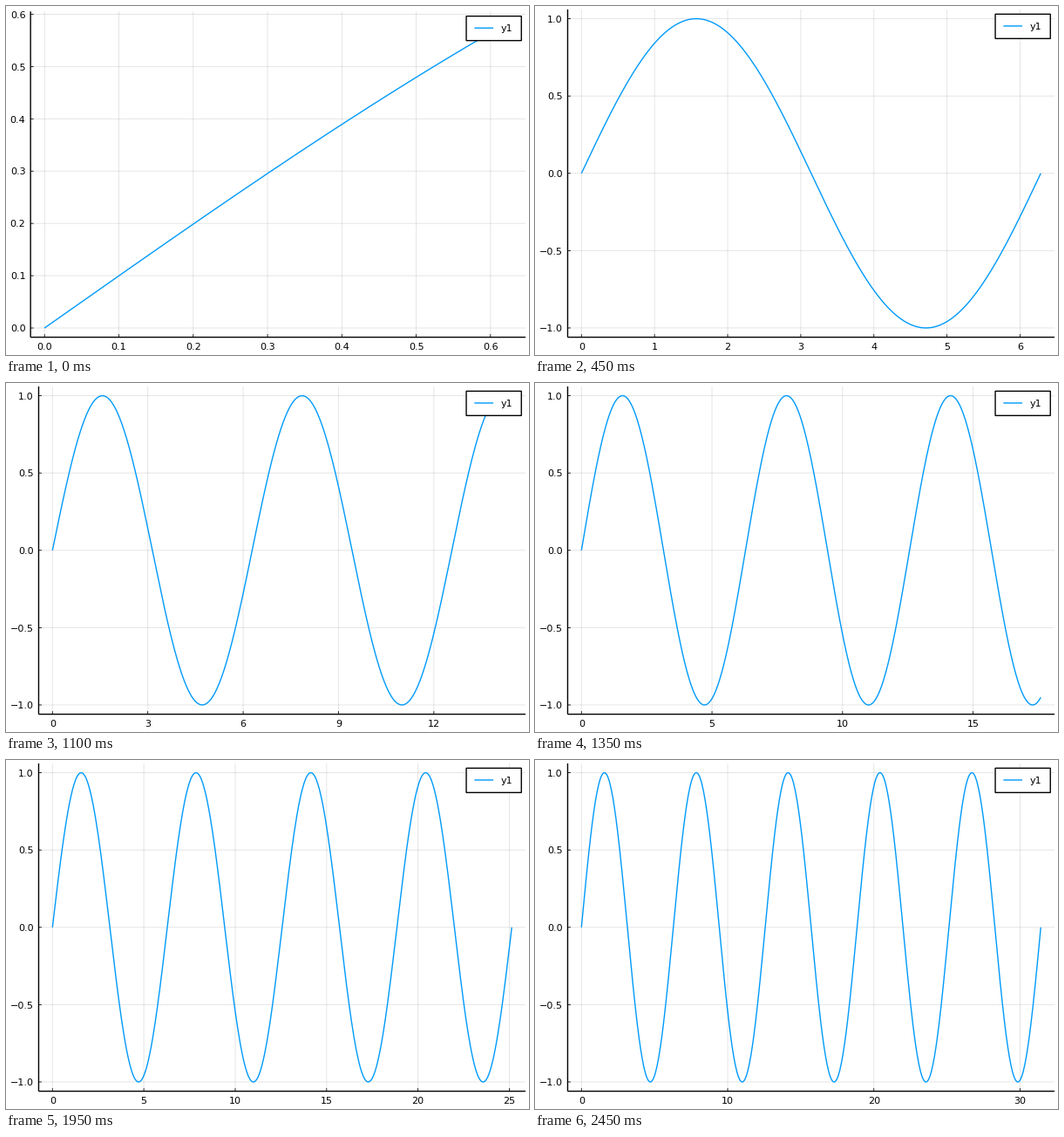
Animation of 600 by 400 pixels, one loop 2500 ms. Source, as a matplotlib script:

```python
import math

import numpy as np
import matplotlib.pyplot as plt
from matplotlib.animation import FuncAnimation
from matplotlib.patches import Rectangle

W, H, DPI = 600, 400, 100
FRAMES, INTERVAL = 50, 50
RIGHT, TOP, BOTTOM = 596.06, 3.94, 379.6
BLUE = "#009afa"
EM = 8 * DPI / 72
ADVANCE = {".": 0.318, "\u2212": 0.838}
# Tick step mantissas with their niceness
STEPS = [(1, 1.0), (5, 0.9), (2, 0.7), (2.5, 0.5), (3, 0.2)]

plt.rcParams["font.family"] = "DejaVu Sans"
fig = plt.figure(figsize=(W / DPI, H / DPI), dpi=DPI, facecolor="white")
ax = fig.add_axes([0, 0, 1, 1])


def widen(values):
    lo, hi = values.min(), values.max()
    pad = 0.03 * (hi - lo)
    return lo - pad, hi + pad


def find_ticks(lo, hi):
    """Pick 4 to 8 ticks, weighing count, zero, coverage and niceness."""
    span = hi - lo
    best, best_score = None, -math.inf
    for z in range(2, -4, -1):
        options = []
        for rank, (mantissa, nice) in enumerate(STEPS):
            step = mantissa * 10.0 ** z
            cover = math.ceil(hi / step) - math.floor(lo / step)
            options.append((cover, rank, step, nice))
        for cover, _, step, nice in sorted(options):
            first, last = math.ceil(lo / step), math.floor(hi / step)
            count = last - first + 1
            if not 4 <= count <= 8 or cover > 15 or cover * step >= 2 * span:
                continue
            granularity = 1 - abs(count - 5) / 5
            has_zero = first <= 0 <= last
            score = round(granularity / 4 + has_zero / 6
                          + 0.5 * span / ((count - 1) * step) + nice / 4, 9)
            if score > best_score:
                best_score = score
                best = [n * step for n in range(first, last + 1)], step
    return best


def tick_labels(ticks, step):
    digits = 0
    while abs(step * 10 ** digits - round(step * 10 ** digits)) > 1e-6:
        digits += 1
    return [f"{t:.{digits}f}".replace("-", "\u2212") for t in ticks]


def text_width(label):
    return EM * sum(ADVANCE.get(c, 0.636) for c in label)


def line(xs, ys, color="black", px=1.39, **kw):
    ax.plot(xs, ys, color=color, lw=px * 72 / DPI, snap=False,
            solid_capstyle="butt", **kw)


def text(x, y, label, ha):
    ax.text(x, y, label, fontsize=8, ha=ha, va="baseline", color="black")


def legend(right, top):
    ax.add_patch(Rectangle((right - 68, top + 5.4), 63.2, 28, fc="white",
                           ec="black", lw=1, snap=False, zorder=5))
    line([right - 58.7, right - 37], [top + 19] * 2, BLUE, zorder=6)
    ax.text(right - 28.4, top + 23, "y1", fontsize=8, va="baseline", zorder=6)


def draw(i):
    ax.cla()
    ax.set_xlim(0, W)
    ax.set_ylim(H, 0)
    ax.axis("off")

    x = np.linspace(0, 2 * math.pi * (i + 1) / 10, 600)
    y = np.sin(x)
    (x0, x1), (y0, y1) = widen(x), widen(y)
    xticks, xstep = find_ticks(x0, x1)
    yticks, ystep = find_ticks(y0, y1)
    xlabels = tick_labels(xticks, xstep)
    ylabels = tick_labels(yticks, ystep)

    # Margins grow to keep the outermost labels on the stage
    left = 10.5 + max(map(text_width, ylabels))
    x_gap = (x1 - xticks[-1]) / (x1 - x0) * (RIGHT - left)
    y_gap = (y1 - yticks[-1]) / (y1 - y0) * (BOTTOM - TOP)
    right = min(RIGHT, W - 8.7 + x_gap)
    top = max(TOP, 9.5 - y_gap)

    def px(v):
        return left + (v - x0) / (x1 - x0) * (right - left)

    def py(v):
        return BOTTOM - (v - y0) / (y1 - y0) * (BOTTOM - top)

    for t, label in zip(xticks, xlabels):
        p = px(t)
        line([p, p], [top, BOTTOM], px=1, alpha=0.1)
        line([p, p], [BOTTOM - 3.5, BOTTOM], px=0.8)
        text(p, 394, label, "center")
    for t, label in zip(yticks, ylabels):
        p = py(t)
        line([left, right], [p, p], px=1, alpha=0.1)
        line([left, left + 3.5], [p, p], px=0.8)
        text(left - 5.7, p + 4.2, label, "right")

    line([left, right], [BOTTOM, BOTTOM])
    line([left, left], [top, BOTTOM])
    line(px(x), py(y), BLUE)
    legend(right, top)
    return []


anim = FuncAnimation(fig, draw, frames=FRAMES, interval=INTERVAL,
                     init_func=lambda: [], repeat=True, repeat_delay=0)
plt.show()
```
